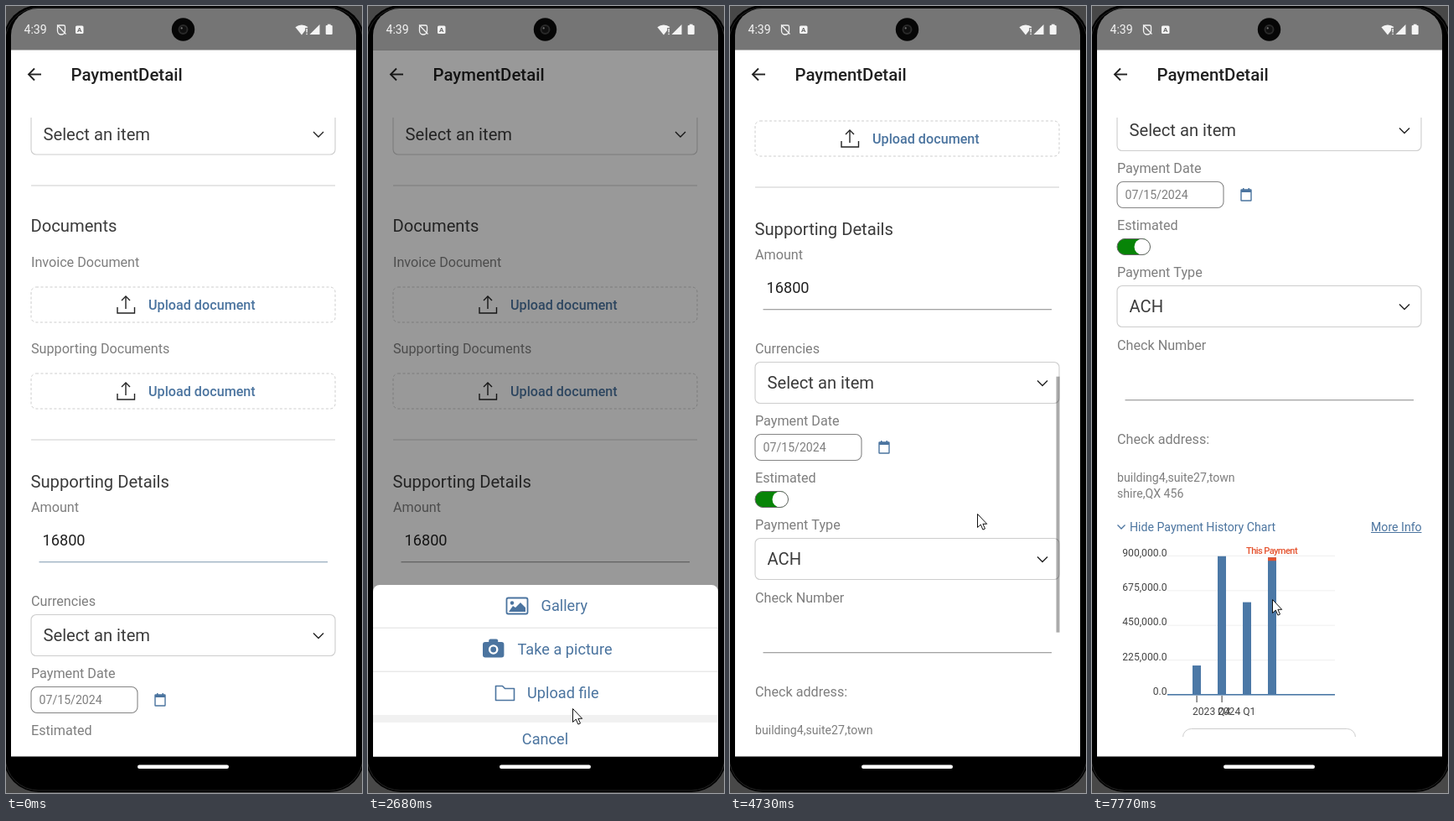
An HTML page with a canvas that plays this animation: 425 by 938 pixels, repeating every 8000 ms.

```html
<!DOCTYPE html>
<html lang="en">
<head>
<meta charset="utf-8">
<title>Payment detail</title>
<style>
html, body { margin: 0; width: 100%; height: 100%; overflow: hidden; background: #444; }
canvas { display: block; width: 425px; height: 938px; }
</style>
</head>
<body>
<canvas id="stage"></canvas>
<script>
const W = 425, H = 938, LOOP = 8000;
const LEFT = 30, WIDE = 363, MID = 211.5;
const TOP = 133, BOTTOM = 871, SCROLL = 602, STEP = 78;
const BLUE = '#4b749f', DARK = '#3b3b3b', GREY = '#7e7e7e', INK = '#222';
const LINE = '#a3a3a3', FOCUS = '#9bafc1', SOFT = '#cdcdcd';
const stage = document.getElementById('stage');
const dpr = window.devicePixelRatio || 1;
stage.width = W * dpr;
stage.height = H * dpr;
const ctx = stage.getContext('2d');

// The pointer moves in even steps along curves, each from the last end.
const entry = { x: 384, y: 859 };
const moves = [
  { at: 210, steps: 11, bend: { x: 304, y: 606 }, to: { x: 224, y: 353 } },
  { at: 2060, steps: 11, bend: { x: 332, y: 955 }, to: { x: 180, y: 817 } },
  { at: 2910, steps: 8, bend: { x: 330, y: 660 }, to: { x: 296, y: 606 } },
  { at: 3750, steps: 1, to: { x: 295, y: 605 } },
  { at: 5590, steps: 6, bend: { x: 251, y: 625 }, to: { x: 227, y: 619 } },
  { at: 6990, steps: 4, bend: { x: 223, y: 662 }, to: { x: 219, y: 706 } },
  { at: 7770, steps: 1, to: { x: 215, y: 707 } }
];

function text(str, x, cy, size, color, weight = 400, align = 'left') {
  ctx.font = `${weight} ${size * 1.01}px Roboto, sans-serif`;
  ctx.textAlign = align;
  ctx.fillStyle = color;
  ctx.fillText(str, x, Math.round(cy + size * 0.355));
}

function rect(x, y, w, h, color) {
  ctx.fillStyle = color;
  ctx.fillRect(x, y, w, h);
}

function round(x, y, w, h, r, fill, stroke, width = 1) {
  ctx.beginPath();
  ctx.roundRect(x, y, w, h, r);
  if (fill) { ctx.fillStyle = fill; ctx.fill(); }
  if (stroke) { ctx.strokeStyle = stroke; ctx.lineWidth = width; ctx.stroke(); }
}

const circle = (x, y, r, fill, stroke, width) =>
  round(x - r, y - r, 2 * r, 2 * r, r, fill, stroke, width);

function trace(points, closed) {
  ctx.beginPath();
  points.forEach(p => ctx.lineTo(p[0], p[1]));
  if (closed) ctx.closePath();
}

function line(points, color, width = 1, closed = false) {
  trace(points, closed);
  ctx.strokeStyle = color;
  ctx.lineWidth = width;
  ctx.stroke();
}

function poly(points, color) {
  trace(points, true);
  ctx.fillStyle = color;
  ctx.fill();
}

// Open angle with its tip at x, y; a negative h points up.
const vee = (x, y, w, h, color, width = 1.4) =>
  line([[x - w, y - h], [x, y], [x + w, y - h]], color, width);

const label = (str, y) => text(str, LEFT, y, 16, GREY);
const title = (str, y) => text(str, LEFT - 0.5, y, 20, DARK);
const rule = y => rect(LEFT, y - 0.5, WIDE, 1, SOFT);

function select(value, y) {
  round(LEFT, y - 24.5, WIDE, 49, 6, null, SOFT, 1.1);
  text(value, 44.5, y, 20, DARK);
  vee(373, y + 3.5, 6, 6, INK);
}

function picker(name, value, y) {
  label(name, y);
  select(value, y + 41);
}

function input(name, value, y, color = LINE) {
  label(name, y);
  text(value, 43.5, y + 40, 18, INK);
  rect(39.5, y + 65, 344.5, 1.3, color);
}

function uploader(name, y) {
  label(name, y);
  y += 51;
  ctx.setLineDash([3, 2.5]);
  round(LEFT, y - 21, WIDE, 42, 6, null, SOFT);
  ctx.setLineDash([]);
  line([[143, y + 5], [143, y - 10]], INK, 1.4);
  vee(143, y - 10, 5, -5, INK);
  line([[133, y + 3], [133, y + 10], [153.5, y + 10], [153.5, y + 3]], INK, 1.4);
  text('Upload document', 170, y, 16, BLUE, 500);
}

function dateField(y) {
  round(LEFT, y - 15.5, 127, 31, 7, null, '#858585', 1.1);
  text('07/15/2024', 39.5, y, 14, GREY);
  round(178, y - 6, 12, 13, 0.5, null, BLUE, 1.4);
  rect(178, y - 6, 12, 3, BLUE);
  for (const x of [180, 186.5]) rect(x, y - 8, 1.5, 3, BLUE);
}

function toggle(y) {
  round(LEFT, y - 10, 39.5, 20, 10, '#078407');
  circle(60, y, 9.5, '#fff');
  round(LEFT, y - 9.5, 39.5, 19, 9.5, null, '#666');
}

function chart() {
  const base = 821, step = 41.4, unit = 225000;
  for (let i = 0; i < 5; i++) {
    const y = base - i * step;
    if (i) rect(90, y - 0.5, 200, 1, '#efefef');
    text((i * unit).toLocaleString('en-US') + '.0', 89.5, y - 4, 12, '#444', 400, 'right');
  }
  [190, 898, 600, 890].forEach((k, i) => {
    const h = k * 1000 / unit * step;
    rect(120 + i * 30, base - h, 10, h, '#4b78a6');
    if (i === 3) rect(120 + i * 30, base - h, 10, 4, '#e5532f');
  });
  rect(90, base - 1, 200, 1.6, '#4b78a6');
  ['2023 Q4', '2024 Q1'].forEach((quarter, i) => {
    rect(124.5 + i * 30, base + 1, 1.2, 8, '#555');
    text(quarter, 120 + i * 30, base + 20, 12, '#444');
  });
  ctx.letterSpacing = '-0.6px';
  text('This Payment', 214.5, 649, 11, '#e5532f', 500, 'center');
  ctx.letterSpacing = '0px';
}

function history(open) {
  const y = 621;
  if (open) {
    vee(35, y + 2, 4.5, 4.5, BLUE, 1.3);
    text('Hide Payment History Chart', 45, y, 14, BLUE);
    text('More Info', 333, y, 14, BLUE);
    rect(333, y + 6, 60.5, 1, BLUE);
    chart();
    round(108.5, 861.5, 206, 44, 10, null, SOFT);
    return;
  }
  line([[LEFT + 0.5, y - 7], [LEFT + 0.5, y + 5.5], [47.5, y + 5.5]], BLUE, 1.2);
  [5, 9, 7, 11].forEach((h, i) => rect(33 + i * 3.6, y + 4 - h, 2.2, h, BLUE));
  text('Show Payment History Chart', 52.5, y, 14, BLUE);
  input('Memo', '', 661, FOCUS);
  input('Notes', '', 773);
}

function form(t, scroll) {
  ctx.save();
  ctx.beginPath();
  ctx.rect(6, TOP, 412, BOTTOM - TOP);
  ctx.clip();
  ctx.translate(0, -scroll);
  select('Select an item', 152.5);
  rule(214);
  title('Documents', 262);
  uploader('Invoice Document', 305);
  uploader('Supporting Documents', 408);
  rule(517);
  title('Supporting Details', 567);
  input('Amount', '16800', 597, t < 1600 ? FOCUS : LINE);
  picker('Currencies', 'Select an item', 709);
  label('Payment Date', 795);
  dateField(827);
  label('Estimated', 863);

  ctx.translate(0, SCROLL);
  toggle(287);
  picker('Payment Type', 'ACH', 317);
  input('Check Number', '', 404);
  label('Check address:', 516);
  text('building4,suite27,town', LEFT, 562, 14, GREY);
  text('shire,QX 456', LEFT, 581, 14, GREY);
  history(t >= 6440);
  ctx.restore();
}

function scrollbar(t, scroll) {
  if (t < 4730 || t > 5900) return;
  const view = BOTTOM - TOP, total = 1786;
  const fade = Math.min(1, (5900 - t) / 310);
  const y = TOP + (total - view - SCROLL + scroll) * view / total;
  rect(389.5, y, 4, view * view / total, `rgba(0,0,0,${0.33 * fade})`);
}

function header() {
  const y = 81.5;
  line([[42, y], [27, y]], INK, 1.9);
  line([[34, y - 7], [27, y], [34, y + 7]], INK, 1.9);
  text('PaymentDetail', 77.5, 82, 20.2, '#202020', 500);
}

function pictureIcon(x, y) {
  round(x - 12.5, y - 9.5, 25, 19, 2, null, BLUE, 1.8);
  circle(x - 6, y - 3.5, 2.2, BLUE);
  poly([[x - 10, y + 7], [x - 5, y], [x - 2, y + 2], [x + 4, y - 4], [x + 10, y + 2], [x + 10, y + 7]], BLUE);
}

function cameraIcon(x, y) {
  round(x - 12.7, y - 9, 25.4, 18.5, 3, BLUE);
  round(x - 5.5, y - 12.5, 11, 8, 2, BLUE);
  circle(x, y, 4.6, null, '#fff', 2.4);
}

function folderIcon(x, y) {
  const l = x - 11, r = x + 11, t = y - 8.5, b = y + 8.5;
  ctx.lineJoin = 'round';
  line([[l, t], [x - 3, t], [x, t + 3], [r, t + 3], [r, b], [l, b]], BLUE, 1.6, true);
  ctx.lineJoin = 'miter';
}

function sheet() {
  rect(6, 52, 412, 842, 'rgba(0,0,0,0.4)');
  round(6, 690, 412, 204.5, [8, 8, 0, 0], '#fff');
  const rows = [
    ['Gallery', 206.5, pictureIcon, 178],
    ['Take a picture', 178.5, cameraIcon, 149.7],
    ['Upload file', 190, folderIcon, 163.5]
  ];
  rows.forEach(([name, x, icon, iconX], i) => {
    const y = 715 + i * 52;
    icon(iconX, y);
    text(name, x, y, 18, BLUE);
    if (i < 2) rect(6, y + 25.5, 412, 1.5, '#e9e9e9');
  });
  rect(6, 845, 412, 9, '#f1f1f1');
  text('Cancel', MID, 874, 18, BLUE, 400, 'center');
}

function phone() {
  rect(0, 0, W, H, '#484848');
  round(-3, -1, 431, 938, 42, '#000');
  round(-1, 2, 427, 933, 40, null, '#242424');
  round(6, 3, 412, 60, [32, 32, 0, 0], '#757575');
  rect(6, 52.5, 412, 842, '#fff');
  round(157, 904.5, 109, 4.5, 2.2, '#fff');
  circle(MID, 28, 13.7, '#060606');
  circle(MID, 28, 5, '#101010', '#292929', 2);
  circle(MID - 1.8, 26.4, 1.1, '#777');
}

function status() {
  const ink = '#f4f4f4', y = 28;
  text('4:39', 21.5, y + 0.5, 14, ink);
  round(61.5, y - 5, 9, 11, [2, 2, 5, 5], null, ink, 1.3);
  line([[61, y - 5.5], [71.5, y + 5.5]], ink, 1.2);
  round(83, y - 4.5, 9.5, 9.5, 1.5, ink);
  text('A', 87.8, y + 0.3, 8, '#666', 700, 'center');
  ctx.beginPath();
  ctx.moveTo(353, y + 6.5);
  ctx.arc(353, y + 6.5, 12, -2.25, -0.9);
  ctx.fillStyle = ink;
  ctx.fill();
  rect(357.2, y - 2, 4, 9, '#757575');
  rect(358.4, y - 1, 1.4, 4.5, ink);
  rect(358.4, y + 4.7, 1.4, 1.4, ink);
  poly([[374.5, y - 6], [374.5, y + 6], [362.5, y + 6]], ink);
  round(381.7, y - 5, 8, 11, 1, ink);
  rect(383.8, y - 6.3, 3.8, 2, ink);
}

function pointer(t) {
  const n = moves.findLastIndex(m => t >= m.at);
  if (n < 0) return;
  const { at, steps, to, bend = to } = moves[n];
  const from = n ? moves[n - 1].to : entry;
  const p = Math.min(1, (Math.floor((t - at) / STEP) + 1) / steps), q = 1 - p;
  const mix = c => Math.round(q * q * from[c] + 2 * p * q * bend[c] + p * p * to[c]);
  const x = mix('x') + 0.5, y = mix('y') + 0.5;
  const shape = [[0, 0], [0, 16], [3.8, 12.6], [6.4, 18.6], [9, 17.5], [6.4, 11.8], [11.2, 11.8]]
    .map(([dx, dy]) => [x + dx, y + dy]);
  poly(shape, '#fff');
  line(shape, '#111', 1, true);
}

function draw(t) {
  const scroll = t < 4730 ? 0 : t < 4810 ? SCROLL / 2 : SCROLL;
  ctx.setTransform(dpr, 0, 0, dpr, 0, 0);
  phone();
  status();
  header();
  form(t, scroll);
  scrollbar(t, scroll);
  if (t >= 1600 && t < 3920) sheet();
  pointer(t);
}

const began = performance.now();
function tick() {
  draw((performance.now() - began) % LOOP);
  requestAnimationFrame(tick);
}
tick();
</script>
</body>
</html>
```
